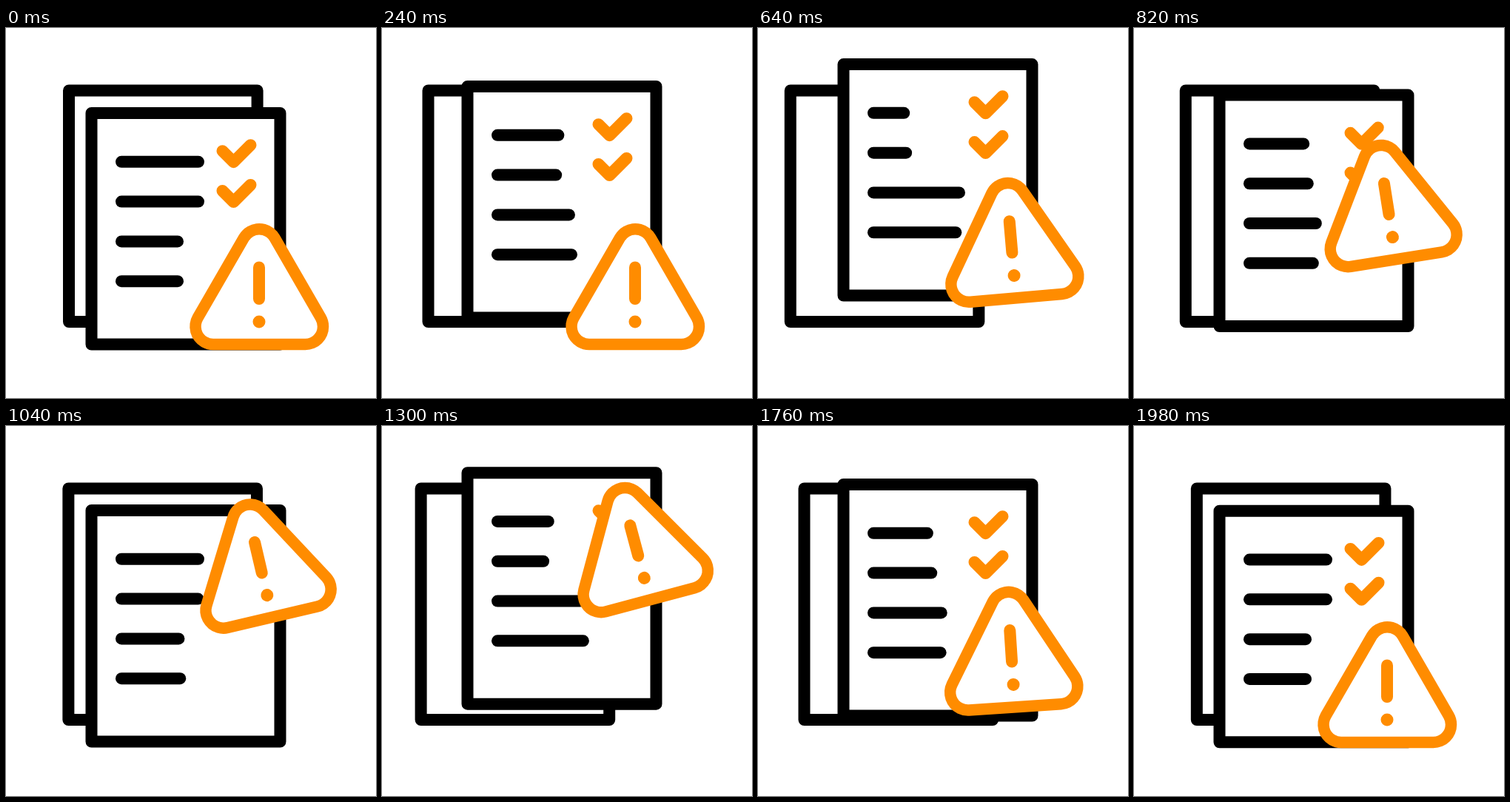
Write an HTML page that moves like this. It is 500 px wide and 500 px high and loops after 2 s.

```html
<!DOCTYPE html>
<html lang="en">
<head>
<meta charset="utf-8">
<title>Checklist warning</title>
<style>
  html, body { margin: 0; width: 100%; height: 100%; overflow: hidden; background: #fff; }
  svg { display: block; width: 100vw; height: 100vh; }
  .ink { fill: #fff; stroke: #000; stroke-width: 16; }
  .accent { fill: none; stroke: #ff8c00; stroke-width: 16; }
  svg * { stroke-linecap: round; stroke-linejoin: round; }
</style>
</head>
<body>
<svg viewBox="0 0 500 500">
  <rect id="back" class="ink" x="85" y="84.5" width="254.6" height="312.5"/>
  <g id="front">
    <rect class="ink" x="115.5" y="115" width="255" height="312.5"/>
    <g id="lines"></g>
    <path class="accent check" pathLength="1" d="M292.5 166.2l15 15 23-23"/>
    <path class="accent check" pathLength="1" d="M292.5 220l15 15 23-23"/>
  </g>
  <g id="sign">
    <path d="M280 403.5H404.5L342.25 295.7Z" fill="#ff8c00" stroke="#ff8c00" stroke-width="63.5"/>
    <path d="M280 403.5H404.5L342.25 295.7Z" fill="#fff" stroke="#fff" stroke-width="32.5"/>
    <path class="accent" d="M342 323.5V366"/>
    <circle cx="342" cy="397" r="8.5" fill="#ff8c00"/>
  </g>
</svg>
<script>
  const LOOP = 2000;
  const STEP = 1000 / 60;
  const byId = id => document.getElementById(id);
  const back = byId('back'), front = byId('front'), sign = byId('sign');
  const checks = document.querySelectorAll('.check');

  // Each list of times alternates rest, peak, rest, peak, rest.
  const pageTimes = [0, 500, 1000, 1500, 2000];
  const signRise = [250, 1250], signFall = [1320, 1983];
  const checkErase = [800, 1000], checkDraw = [1050, 1300];
  const rows = [
    { y: 180.8, end: 260, grow: -64, times: [0, 598, 1025, 1540, 1985] },
    { y: 234.6, end: 260, grow: -65, times: [0, 555, 1010, 1495, 1972] },
    { y: 288.4, end: 232, grow: 48,  times: [0, 510, 985, 1455, 1960] },
    { y: 342.2, end: 232, grow: 48,  times: [0, 467, 960, 1420, 1967] }
  ];

  for (const row of rows) {
    row.el = document.createElementNS('http://www.w3.org/2000/svg', 'path');
    row.el.setAttribute('class', 'ink');
    byId('lines').append(row.el);
  }

  function ease(t, [from, to]) {
    const s = Math.min(1, Math.max(0, (t - from) / (to - from)));
    return s * s * (3 - 2 * s);
  }

  function swing(t, times) {
    let sum = 0;
    for (let i = 0; i < times.length - 1; i++) {
      sum += (i % 2 ? -1 : 1) * ease(t, [times[i], times[i + 1]]);
    }
    return sum;
  }

  function draw(now) {
    const t = Math.round((now % LOOP) / STEP) * STEP;
    const page = swing(t, pageTimes);
    back.setAttribute('transform', `translate(${-50 * page} 0)`);
    front.setAttribute('transform', `translate(0 ${-80 * page})`);
    for (const { el, y, end, grow, times } of rows) {
      el.setAttribute('d', `M156 ${y}H${end + grow * swing(t, times)}`);
    }

    const shown = 1 - ease(t, checkErase) + ease(t, checkDraw);
    for (const check of checks) {
      check.style.visibility = shown > 0.001 ? 'visible' : 'hidden';
      check.style.strokeDasharray = shown < 1 ? `${shown} 2` : 'none';
    }

    const lift = ease(t, signRise) - ease(t, signFall);
    sign.setAttribute('transform',
      `translate(0 ${-190 * lift}) rotate(${-15 * lift} 342 349.5)`);
  }

  let start;
  function tick(now) {
    start ??= now;
    draw(now - start);
    requestAnimationFrame(tick);
  }
  draw(0);
  requestAnimationFrame(tick);
</script>
</body>
</html>
```
